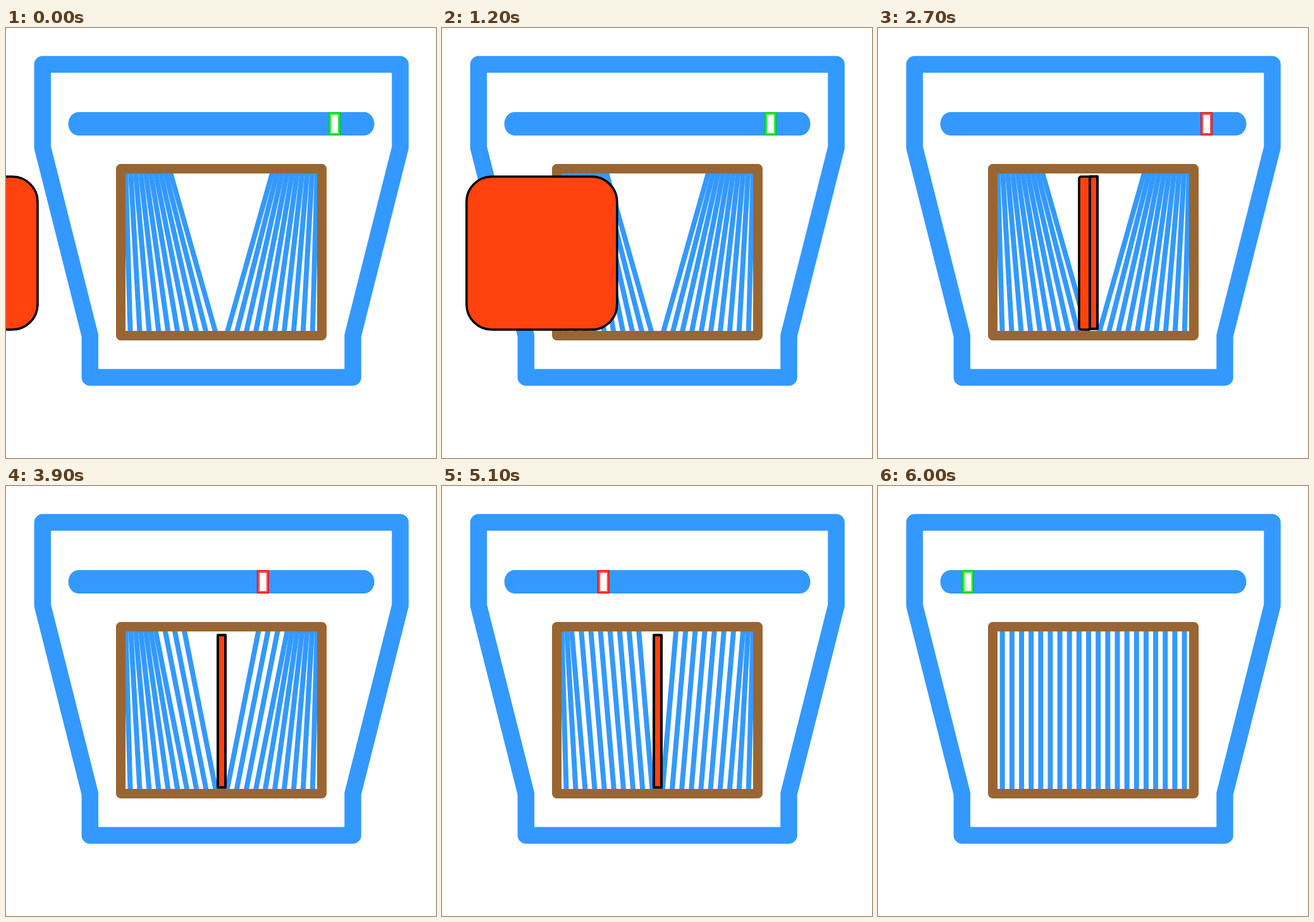
An HTML page that plays this animation: 680 by 680 pixels, repeating every 6.3 s.

```html
<!DOCTYPE html>
<html lang="en">
<head>
<meta charset="utf-8">
<title>Slider and fan</title>
<style>
  html, body { margin: 0; width: 100%; height: 100%; overflow: hidden; background: #fff; }
  svg { display: block; width: 680px; height: 680px; }
  .body, .frame { fill: none; stroke-linejoin: round; }
  .body { stroke: #39f; stroke-width: 26.5; }
  .frame { stroke: #963; stroke-width: 15; }
  #fan { stroke: #39f; stroke-width: 8; }
  #card, #bar { fill: #ff420e; stroke: #000; }
  #card { stroke-width: 3.6; }
  #bar { stroke-width: 4; stroke-linejoin: round; }
  #knob { --edge: #0c1; --rim: #3e3; }
  #knob.hold { --edge: #d11; --rim: #f05050; }
  #knob.move { --edge: #f00; --rim: #ff5050; }
  .edge { fill: var(--edge); }
  .rim { fill: var(--rim); }
</style>
</head>
<body>
<svg viewBox="0 0 680 680">
  <path class="body" d="M57.8 57.5H623.5V189L548.5 486.5V552.5H132.8V486.5L57.8 189Z"/>
  <rect x="98.5" y="133" width="484" height="37" rx="16" ry="18.5" fill="#39f"/>
  <g id="knob">
    <rect class="edge" x="-9.5" y="133" width="19" height="37"/>
    <rect class="rim" x="-8" y="134.5" width="16" height="34"/>
    <rect x="-5" y="137.5" width="10.5" height="28.5" fill="#fff"/>
  </g>
  <g id="fan"></g>
  <rect class="frame" x="181.5" y="222.5" width="318" height="264"/>
  <rect id="card" y="235" height="242"/>
  <rect id="bar" x="335" width="12" height="241"/>
</svg>
<script>
  const STEP = 300, COUNT = 21;
  const PAIRS = 10, GAP = 15.15, LEAN = 7.5;
  const TOP = 222, BOTTOM = 487;
  const get = id => document.getElementById(id);
  const set = (el, attrs) => {
    for (const key in attrs) el.setAttribute(key, attrs[key]);
  };
  const knob = get('knob'), fan = get('fan'), card = get('card'), bar = get('bar');

  const lines = Array.from({ length: PAIRS * 2 }, () =>
    fan.appendChild(document.createElementNS('http://www.w3.org/2000/svg', 'line')));

  // Each line leans outward until it meets its neighbour at the wall.
  function drawFan(level) {
    lines.forEach((line, i) => {
      const left = i < PAIRS;
      const rank = left ? i + 1 : PAIRS * 2 - i;
      const x = 196.7 + GAP * i;
      const lean = LEAN * Math.min(level, rank) * (left ? -1 : 1);
      set(line, { x1: x + lean, y1: TOP, x2: x, y2: BOTTOM });
    });
  }

  // The card slides in, then narrows against the bar.
  function drawCard(n) {
    card.style.display = n < 10 ? '' : 'none';
    if (n > 9) return;
    const k = n - 5;
    const squeezed = k > 0;
    const x = squeezed ? 98 + 62.8 * k - 1.95 * k * k : -188 + 56.7 * n;
    const width = squeezed ? 238 - 54.8 * k : 238;
    set(card, { x, width, rx: squeezed ? width * 0.172 : 40 });
  }

  function draw(n) {
    const travel = Math.max(0, n - 10);
    knob.setAttribute('class', n < 5 || n > 19 ? '' : n < 10 ? 'hold' : 'move');
    knob.setAttribute('transform', `translate(${519.5 - 37.75 * travel} 0)`);
    drawFan(PAIRS - travel);
    drawCard(n);
    bar.style.display = n > 4 && n < 20 ? '' : 'none';
    bar.setAttribute('y', n < 10 ? 234.7 : 235.8);
  }

  let shown = -1;
  function tick() {
    const n = Math.floor(performance.now() / STEP) % COUNT;
    if (n !== shown) draw(shown = n);
    requestAnimationFrame(tick);
  }
  tick();
</script>
</body>
</html>
```
